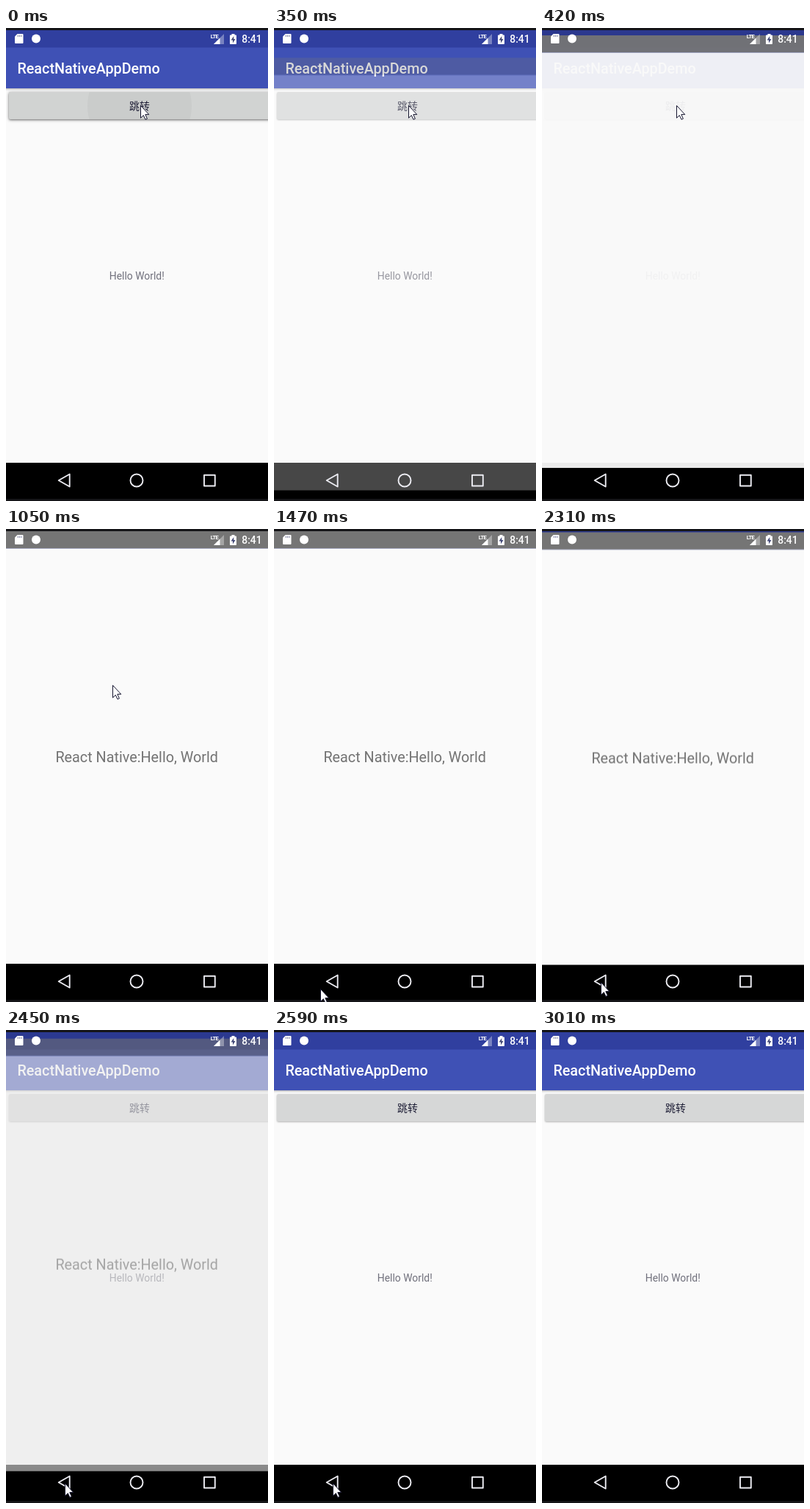
Animation of 357 by 643 pixels, one loop 3.78 s. Source, as an HTML page:

```html
<!DOCTYPE html>
<html lang="zh">
<head>
<meta charset="utf-8">
<title>App demo</title>
<style>
html, body { margin: 0; width: 100%; height: 100%; overflow: hidden; background: #000; }
svg { display: block; width: 357px; height: 643px; font-family: Roboto, sans-serif; }
.mid { text-anchor: middle; }

/* one loop, advancing in 70 ms steps */
#home, #halo, #touch, #next, #hello, #tap, #cursor {
  animation: 3780ms step-end infinite;
}
#home { animation-name: dim; }
#halo { animation-name: press; }
#touch { animation-name: touch; transform-origin: 182px 106px; }
#next { animation-name: slide; }
#hello { animation-name: appear; }
#tap { animation-name: tap; transform-origin: 79px 615px; }
#cursor { animation-name: move; }

#title-bar { filter: drop-shadow(0 1.5px 1.5px rgba(0, 0, 0, .32)); }
#button { filter: drop-shadow(0 1px 1px rgba(0, 0, 0, .3)); }
#halo { filter: drop-shadow(0 1.5px 2px rgba(0, 0, 0, .38)); }

@keyframes press {
  0% { opacity: 1; }
  1.85% { opacity: .75; }
  3.7% { opacity: .4; }
  5.55%, 100% { opacity: 0; }
}
@keyframes touch {
  0% { transform: scale(1); opacity: 1; }
  1.85% { transform: scale(1.8); opacity: .75; }
  3.7% { transform: scale(2.6); opacity: .4; }
  5.55%, 100% { transform: scale(2.6); opacity: 0; }
}
@keyframes dim {
  0%, 9.25% { opacity: 1; }
  11.11% { opacity: .9; }
  62.96% { opacity: .9; }
  64.81% { opacity: .91; }
  66.66% { opacity: .96; }
  68.51%, 100% { opacity: 1; }
}
@keyframes slide {
  0% { transform: translateY(47px); opacity: 0; }
  9.25% { transform: translateY(37.5px); opacity: .285; }
  11.11% { transform: translateY(7px); opacity: .945; }
  12.96% { transform: translateY(2px); opacity: 1; }
  14.81% { transform: none; opacity: 1; }
  59.25% { transform: translateY(.5px); opacity: 1; }
  61.11% { transform: translateY(1.5px); opacity: 1; }
  62.96% { transform: translateY(4px); opacity: .86; }
  64.81% { transform: translateY(8.7px); opacity: .555; }
  66.66% { transform: translateY(19px); opacity: .2; }
  68.51%, 100% { transform: translateY(47px); opacity: 0; }
}
@keyframes appear {
  0% { opacity: 0; }
  18.51%, 100% { opacity: 1; }
}
@keyframes tap {
  0% { opacity: 0; transform: none; }
  49.99% { opacity: 1; transform: none; }
  51.85% { opacity: .95; transform: scaleX(1.4); }
  53.7% { opacity: .85; transform: scaleX(1.64); }
  57.4% { opacity: .35; transform: scaleX(1.64); }
  59.25%, 100% { opacity: 0; transform: none; }
}
@keyframes move {
  0% { transform: translate(183px, 105px); }
  27.77% { transform: translate(145px, 212px); }
  29.62% { transform: translate(102px, 345px); }
  31.48% { transform: translate(64px, 490px); }
  33.33% { transform: translate(41px, 592px); }
  35.18% { transform: translate(60px, 622px); }
  38.88% { transform: translate(63px, 625px); }
  40.74% { transform: translate(68px, 623px); }
  42.59% { transform: translate(73px, 620px); }
  44.44% { transform: translate(77px, 618px); }
  46.29% { transform: translate(80px, 616px); opacity: 1; }
  75.92% { transform: translate(112px, 624px); opacity: 1; }
  77.77% { transform: translate(203px, 636px); opacity: 1; }
  79.62%, 100% { transform: translate(216px, 650px); opacity: 0; }
}
</style>
</head>
<body>
<svg viewBox="0 0 357 643">
  <defs>
    <clipPath id="button-shape"><rect x="4" y="87" width="360" height="37" rx="2"/></clipPath>
    <clipPath id="screen"><rect y="3" width="357" height="637"/></clipPath>
  </defs>
  <rect width="357" height="643" fill="#151518"/>

  <g clip-path="url(#screen)">
    <rect y="3" width="357" height="637"/>

    <g id="home">
      <rect y="26" width="357" height="565" fill="#fafafa"/>
      <rect id="title-bar" x="-5" y="26" width="367" height="56" fill="#3f51b5"/>
      <rect y="3" width="357" height="23.5" fill="#303f9f"/>
      <text x="15.4" y="62" font-size="19.8" font-weight="500" fill="#fff">ReactNativeAppDemo</text>
      <rect id="button" x="4" y="87" width="360" height="37" rx="2" fill="#d6d7d7"/>
      <rect id="halo" x="4" y="87" width="360" height="37" rx="2" fill="#d1d3d2"/>
      <g clip-path="url(#button-shape)">
        <circle id="touch" cx="182" cy="106" r="71" fill="#cacccb"/>
      </g>
      <text class="mid" x="182" y="111" font-size="13.9" fill="#1d1d35" font-family="'Noto Sans CJK SC', 'Noto Sans CJK', sans-serif">跳转</text>
      <text class="mid" x="178.3" y="342" font-size="13.9" fill="#70707c">Hello World!</text>
    </g>

    <g id="next">
      <rect y="3" width="357" height="23.5" fill="#757575"/>
      <rect y="26.5" width="357" height="564.5" fill="#fafafa"/>
      <rect y="591" width="357" height="60"/>
      <text id="hello" class="mid" x="178.2" y="316.6" font-size="19.8" fill="#737373">React Native:Hello, World</text>
    </g>

    <rect id="tap" x="48" y="591" width="62" height="48" rx="24" fill="#363636"/>

    <g fill="#fff">
      <path d="M15.5 8H22.5Q23.5 8 23.5 9V20Q23.5 21 22.5 21H13Q12 21 12 20V11.5Z"/>
      <path d="M16.3 9.5V12M18.6 9.5V12M20.9 9.5V12" stroke="#777b9c" stroke-width="1"/>
      <circle cx="41" cy="14.5" r="6"/>
      <path d="M297 8V22H283Z" opacity=".35"/>
      <path d="M291.5 13.5V22H283Z"/>
      <text x="278.8" y="14" font-size="7.6" font-weight="700" letter-spacing="-.7">LTE</text>
      <path d="M307.5 8H311.5V9.5H313.2Q314 9.5 314 10.3V21.2Q314 22 313.2 22H305.8Q305 22 305 21.2V10.3Q305 9.5 305.8 9.5H307.5Z"/>
      <path d="M310.3 11L306.6 16.6H309V20.4L312.5 14.9H310.3Z" fill="#444a78"/>
      <text x="321.3" y="20" font-size="13.9" font-weight="500">8:41</text>
    </g>

    <g fill="none" stroke="#ececf2" stroke-width="1.9" stroke-linejoin="round">
      <path d="M71.7 615L86.7 606.5V623.5Z"/>
      <circle cx="178" cy="615" r="8.5"/>
      <rect x="270" y="607.7" width="14.8" height="14.8"/>
    </g>
  </g>

  <path id="cursor" d="M.5 .5V17.3L4.3 13.7L7 19.4L9.4 18.3L6.8 12.6H11.8Z" fill="#fff" stroke="#14142e" stroke-width="1"/>
</svg>
</body>
</html>
```
